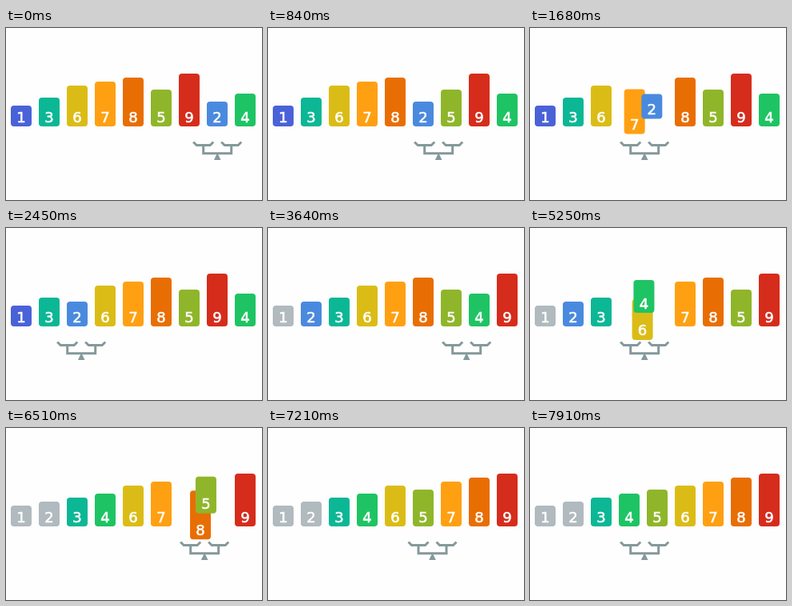
Write an HTML page that moves like this. It is 320 px wide and 215 px high and loops after 8 s.

```html
<!DOCTYPE html>
<html lang="en">
<head>
<meta charset="utf-8">
<title>Bubble sort</title>
<style>
  html, body { margin: 0; width: 100%; height: 100%; overflow: hidden; background: #fefefe; }
  svg { display: block; width: 320px; height: 215px; }
  text {
    font: 18px "DejaVu Sans", sans-serif;
    text-anchor: middle; fill: #fff; stroke: #fff; stroke-width: .6;
  }
  #scale path { fill: none; stroke: #84999b; stroke-width: 3; }
  #scale .foot { fill: #84999b; stroke: none; }
</style>
</head>
<body>
<svg viewBox="0 0 320 215">
  <g id="scale">
    <path d="M-30 142.5l4 4h17l4-4M5 142.5l4 4h17l4-4M-17.5 146.5v10.3h35v-10.3"/>
    <path class="foot" d="M0 156l4.3 9h-8.6z"/>
  </g>
  <g id="bars"></g>
</svg>
<script>
const LOOP = 8000, MOVE = 210, SWAP = 152, GAP = 67, HOLD = 150, RESET = 55;
const STEP = 35, LEFT = 6, FLOOR = 123, WIDTH = 26, ARC = 17, LAST = 7;
const START = [1, 3, 6, 7, 8, 5, 9, 2, 4];
const GREY = '#b0babf';
const COLORS = ['#4a62d8', '#4a8ade', '#0cb795', '#1ec463', '#8fb62a',
                '#dbbc16', '#ffa012', '#e86e04', '#d62c1c'];

// Run the sort once and note when every move, swap and new pass happens.
const moves = [], swaps = [], resets = [];
const work = [...START];
let clock = -113, first = LAST - 1;
const exchange = (list, p) => { [list[p], list[p + 1]] = [list[p + 1], list[p]]; };

for (let done = 0; clock < LOOP; done++) {
  for (let p = first; p >= done; p--) {
    if (p < LAST) {
      moves.push({ start: clock, to: p });
      clock += MOVE;
    }
    if (work[p] > work[p + 1]) {
      swaps.push({ start: clock + GAP, p });
      exchange(work, p);
      clock += SWAP + 2 * GAP;
    } else if (p > done) {
      clock += HOLD;
    }
  }
  resets.push({ start: clock, value: work[done] });
  clock += RESET;
  first = LAST;
}

function make(parent, tag, attrs) {
  const el = document.createElementNS('http://www.w3.org/2000/svg', tag);
  for (const name in attrs) el.setAttribute(name, attrs[name]);
  return parent.appendChild(el);
}

const place = (el, x, y) => el.setAttribute('transform', `translate(${x} ${y})`);

// Small values come last, so a rising bar passes in front.
const bars = {};
for (let v = 9; v > 0; v--) {
  const group = make(document.getElementById('bars'), 'g', {});
  const height = 21 + 5 * v;
  const rect = make(group, 'rect', { y: -height, width: WIDTH, height, rx: 4 });
  make(group, 'text', { x: WIDTH / 2, y: -5.5 }).textContent = v;
  bars[v] = { group, rect };
}
const scale = document.getElementById('scale');

function draw(t) {
  const order = [...START];
  let active = null;
  for (const s of swaps) {
    if (t >= s.start + SWAP) exchange(order, s.p);
    else if (t >= s.start) active = s;
  }
  order.forEach((v, i) => place(bars[v].group, LEFT + STEP * i, FLOOR));
  if (active) {
    const k = (t - active.start) / SWAP, lift = ARC * Math.sin(Math.PI * k);
    const x = LEFT + STEP * active.p;
    place(bars[order[active.p]].group, x + STEP * k, FLOOR + lift);
    place(bars[order[active.p + 1]].group, x + STEP * (1 - k), FLOOR - lift);
  }

  for (const v in bars) bars[v].rect.setAttribute('fill', COLORS[v - 1]);
  let pos = LAST, since = -Infinity;
  for (const m of moves) {
    if (t < m.start) break;
    pos = m.to + 1 - Math.min(1, (t - m.start) / MOVE);
    since = m.start;
  }
  for (const r of resets) {
    if (t < r.start) break;
    bars[r.value].rect.setAttribute('fill', GREY);
    if (r.start > since) pos = LAST;
  }
  place(scale, 38.2 + STEP * pos, 0);
}

function tick(now) {
  draw(now % LOOP);
  requestAnimationFrame(tick);
}
draw(0);
requestAnimationFrame(tick);
</script>
</body>
</html>
```
